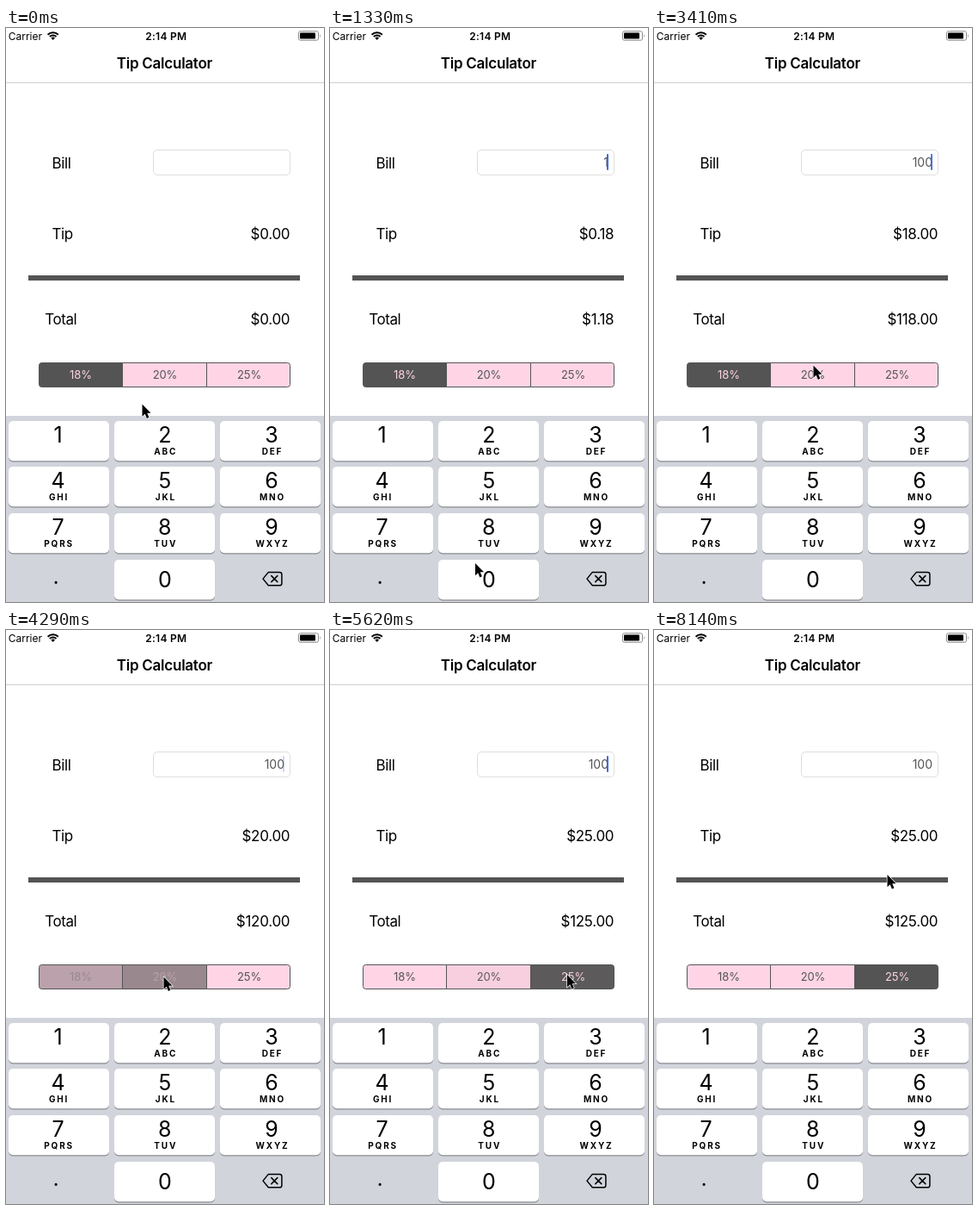
Write an HTML page that moves like this. It is 370x666 px and loops after 8.28 s.

```html
<!DOCTYPE html>
<html lang="en">
<head>
<meta charset="utf-8">
<title>Tip Calculator</title>
<style>
  html, body { margin: 0; width: 100%; height: 100%; overflow: hidden; background: #fff; }
  svg { display: block; width: 370px; height: 666px; font-family: Inter, Roboto, sans-serif; }
  .label { font-size: 17px; letter-spacing: -.4px; }
  .value { font-size: 17px; letter-spacing: -.28px; text-anchor: end; }
  .mid { text-anchor: middle; }
  .segment { font-size: 13px; letter-spacing: -.1px; }
  .digit { font-size: 25px; }
  .letters { font-size: 10px; font-weight: 700; letter-spacing: 1.8px; }
</style>
</head>
<body>
<svg id="stage" viewBox="0 0 370 666"></svg>
<script>
const LOOP = 8280, STEP = LOOP / 56;
const DARK = [84, 84, 84], PINK = [255, 213, 230];
const INK = '#545454';
const RATES = [18, 20, 25];
const stage = document.getElementById('stage');

function add(tag, attrs, text) {
  const el = document.createElementNS('http://www.w3.org/2000/svg', tag);
  for (const name in attrs) el.setAttribute(name, attrs[name]);
  if (text !== undefined) el.textContent = text;
  stage.append(el);
  return el;
}
const rect = (x, y, width, height, fill, rx = 0, more) => add('rect', { x, y, width, height, fill, rx, ...more });
const label = (x, y, text, cls, more) => add('text', { x, y, class: cls, ...more }, text);
const path = (d, more) => add('path', { d, ...more });

// Status bar and title
rect(0, 0, 370, 666, '#fff');
label(2.7, 14, 'Carrier', '', { 'font-size': 12 });
label(186.3, 13.5, '2:14 PM', 'mid', { 'font-size': 12, 'font-weight': 600, 'letter-spacing': .25 });
path('M48.6 7.7a8.6 8.6 0 0 1 12.2 0M50.9 10a5.3 5.3 0 0 1 7.6 0',
  { fill: 'none', stroke: '#000', 'stroke-width': 2 });
path('M54.7 14l-2.3-2.4a3.3 3.3 0 0 1 4.6 0z');
rect(340.5, 3.8, 23, 10.4, 'none', 2, { stroke: '#888' });
rect(342, 5.5, 18, 7, '#000', .8);
path('M365 7.3q1.6 1.7 0 3.6z', { fill: '#777' });
label(184.4, 47, 'Tip Calculator', 'mid', { 'font-size': 17, 'font-weight': 600, 'letter-spacing': -.25 });
rect(0, 63, 370, 1, '#cfcfcf');

// Form
label(53.5, 163, 'Bill', 'label');
label(53.5, 245, 'Tip', 'label');
label(45.2, 344, 'Total', 'label');
rect(171.5, 141.5, 159, 29, '#fff', 4.5, { stroke: '#dedede' });
const billText = label(324, 161, '', '', { 'font-size': 14, fill: INK, 'text-anchor': 'end' });
const caretBar = rect(322, 146, 2, 19, '#4169e1', 1);
const tipText = label(330.3, 245, '', 'value');
const totalText = label(330.3, 344, '', 'value');
rect(26, 287, 316, 6, INK);

// Rate selector
const segments = RATES.map((rate, i) => {
  const left = i ? 37.5 + 98 * i : 38.5, right = i < 2 ? 135.5 + 98 * i : 330.5;
  const d = [
    `M${right} 388.5H41.5a3 3 0 0 0-3 3v22a3 3 0 0 0 3 3H${right}z`,
    `M${left} 388.5H${right}v28H${left}z`,
    `M${left} 388.5H327.5a3 3 0 0 1 3 3v22a3 3 0 0 1-3 3H${left}z`
  ][i];
  return {
    box: path(d, { stroke: INK }),
    text: label(87 + 98 * i, 407, rate + '%', 'segment mid')
  };
});

// Keyboard
rect(0, 450, 370, 216, '#d1d4db');
const keys = {};
function addKey(name, col, row, letters) {
  const x = 3 + 123 * col, y = 456 + Math.floor(53.7 * row), center = 60.6 + 124.2 * col;
  rect(x, y + 1, 117, 46.4, '#898b90', 5);
  keys[name] = rect(x, y, 117, 46.3, '#fff', 5);
  label(center, y + (letters === undefined ? 32 : 25), name, 'digit mid');
  if (letters) label(center + 1, y + 39.3, letters, 'letters mid');
}
['', 'ABC', 'DEF', 'GHI', 'JKL', 'MNO', 'PQRS', 'TUV', 'WXYZ'].forEach((letters, i) =>
  addKey(String(i + 1), i % 3, Math.floor(i / 3), letters));
addKey('0', 1, 3);
label(58, 645, '.', 'digit mid');
path('M305.3 631.4H318.3a2.6 2.6 0 0 1 2.6 2.6v10.2a2.6 2.6 0 0 1-2.6 2.6H305.3L299 639.1zM308.8 635.6l7 7m0-7l-7 7',
  { fill: 'none', stroke: '#000', 'stroke-width': 1.5, 'stroke-linejoin': 'round', 'stroke-linecap': 'round' });

const pointer = path('M0 0V14.2L3.2 11.2L5.4 16.4L7.9 15.3L5.7 10.3H10z',
  { stroke: '#fff', 'stroke-width': 1.4, 'paint-order': 'stroke' });

// What the user does
const home = { x: 158.5, y: 436.5 };
const moves = [
  { from: 80, to: 600, x: 76, y: 480 },
  { from: 950, to: 1330, x: 169, y: 621 },
  { from: 1330, to: 1600, x: 165.5, y: 641 },
  { from: 2850, to: 3100, x: 172, y: 425 },
  { from: 3300, to: 3400, x: 185.5, y: 391.5 },
  { from: 3400, to: 3700, x: 183.5, y: 402.5 },
  { from: 4650, to: 5300, x: 276, y: 400 },
  { from: 5800, to: 6050, x: 240.5, y: 340 },
  { from: 7780, to: 7980, x: 361, y: 650 },
  { from: 7980, to: 8130, x: 271.5, y: 284 }
];
const presses = [
  { key: '1', down: 950, up: 1250 },
  { key: '0', down: 1550, up: 1850 },
  { key: '0', down: 2150, up: 2300 }
];
const choices = [-LOOP, 4150, 5400];
const FADE = 230;

const clamp = value => Math.min(1, Math.max(0, value));
const ease = p => p * p * (3 - 2 * p);
const mix = amount => `rgb(${PINK.map((c, i) => Math.round(c + (DARK[i] - c) * amount))})`;
const money = value => '$' + value.toFixed(2);

function pointerAt(time) {
  return moves.reduce((at, move) => {
    const p = ease(clamp((time - move.from) / (move.to - move.from)));
    return { x: at.x + (move.x - at.x) * p, y: at.y + (move.y - at.y) * p };
  }, home);
}

// Solid just after typing, otherwise a soft blink
function caretAt(time) {
  if (time < 140) return 0;
  if (presses.some(({ up }) => time >= up && time < up + 550)) return 1;
  const period = 980, darkest = 240;
  const phase = (time - darkest + period) % period;
  return clamp((Math.min(phase, period - phase) - 90) / 140);
}

function shadeAt(i, time) {
  const shown = start => clamp((time - start) / FADE);
  return shown(choices[i]) - (i < 2 ? shown(choices[i + 1]) : 0);
}

function render(time) {
  const { x, y } = pointerAt(time);
  const bill = presses.filter(({ up }) => time >= up).map(({ key }) => key).join('');
  const pressed = presses.find(({ down, up }) => time >= down && time < up)?.key;
  const tip = bill * RATES[choices.findLastIndex(start => time >= start)] / 100;

  pointer.setAttribute('transform', `translate(${x} ${y})`);
  caretBar.setAttribute('opacity', caretAt(time));
  billText.textContent = bill;
  tipText.textContent = money(tip);
  totalText.textContent = money(+bill + tip);
  for (const name in keys) keys[name].setAttribute('fill', name === pressed ? '#b6c4d3' : '#fff');
  segments.forEach(({ box, text }, i) => {
    const shade = shadeAt(i, time);
    box.setAttribute('fill', mix(shade));
    text.setAttribute('fill', mix(1 - shade));
  });
}

// The picture advances in even steps, like a screen recording
const start = performance.now();
function tick() {
  const time = (performance.now() - start) % LOOP;
  render(Math.floor((time + 10) / STEP) % 56 * STEP);
  requestAnimationFrame(tick);
}
tick();
</script>
</body>
</html>
```
